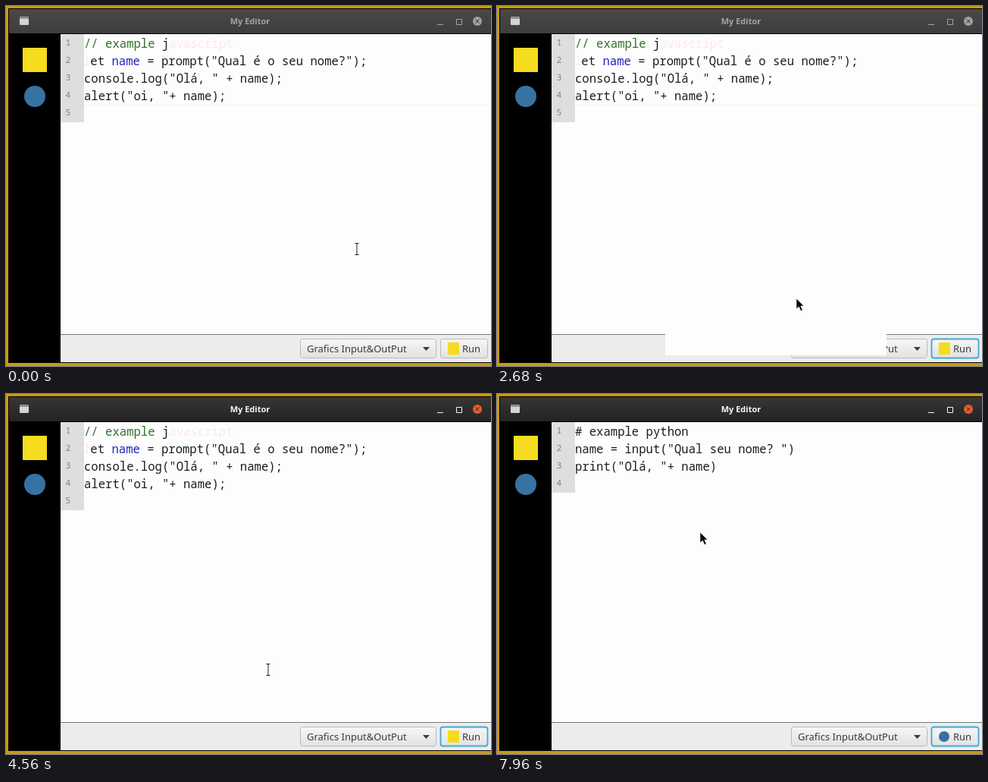
An HTML page that plays this animation: 640x474 px, repeating every 8 s.

```html
<!DOCTYPE html>
<html lang="pt">
<head>
<meta charset="utf-8">
<title>My Editor</title>
<style>
  html, body { margin: 0; width: 100%; height: 100%; overflow: hidden; background: #fdfdfd; }
  svg { display: block; width: 640px; height: 474px; }
  text { white-space: pre; }
  .code { font: 15.6px "Noto Sans Mono", "DejaVu Sans Mono", monospace; fill: #1c1c1c; }
  .num { font: 11.5px "Noto Sans Mono", monospace; fill: #808080; }
  .ui { font: 13px "Noto Sans", "Open Sans", sans-serif; fill: #3a3a3a; }
  .title { font: bold 11px "Noto Sans", "Open Sans", sans-serif; text-anchor: middle; }
  .comment { fill: #32702c; }
  .pale { fill: #ffe9e2; }
  .name { fill: #2420c0; }
</style>
</head>
<body>
<svg viewBox="0 0 640 474">
  <defs>
    <linearGradient id="bar" x2="0" y2="1">
      <stop stop-color="#363636"/><stop offset="1" stop-color="#242424"/>
    </linearGradient>
    <linearGradient id="dimBar" x2="0" y2="1">
      <stop stop-color="#484848"/><stop offset="1" stop-color="#3e3e3e"/>
    </linearGradient>
    <linearGradient id="button" x2="0" y2="1">
      <stop stop-color="#f6f6f6"/><stop offset="1" stop-color="#e2e2e2"/>
    </linearGradient>
  </defs>

  <rect width="640" height="474" fill="#cb9a0e"/>
  <rect x="3" y="3" width="637" height="467"/>
  <rect id="titleBar" x="4" y="4" width="636" height="32"/>
  <rect x="18" y="14" width="12" height="11" rx="1" fill="#d4d4d4"/>
  <path d="M18 15.500H30" stroke="#777" stroke-width="2"/>
  <text id="title" class="title" x="322" y="24">My Editor</text>
  <g id="controls" fill="none">
    <path d="M569 24.500H577M594.500 17.500H601.500V24.500H594.500Z"/>
  </g>
  <circle id="close" cx="622" cy="20" r="6"/>
  <path d="M619.500 17.500L624.500 22.500M624.500 17.500L619.500 22.500" stroke="#402a20"/>

  <rect x="22" y="55" width="32" height="32" fill="#f5dc1f"/>
  <circle cx="38" cy="119" r="14" fill="#3672a2"/>
  <rect x="72" y="37" width="568" height="395" fill="#fdfdfd"/>
  <rect id="caretLine" x="103" y="129" width="537" height="3" fill="#f4fdf0"/>
  <rect id="gutter" x="72" y="37" width="31" fill="#dedede"/>
  <g id="numbers" class="num"></g>

  <g id="js" class="code">
    <text x="103" y="55"><tspan class="comment">// example </tspan>j<tspan class="pale">avascript</tspan></text>
    <text x="102" y="78"><tspan class="pale">l</tspan>et <tspan class="name">name</tspan> = prompt("Qual é o seu nome?");</text>
    <text x="103" y="101">console.log("Olá, " + name);</text>
    <text x="103" y="124">alert("oi, "+ name);</text>
  </g>
  <g id="py" class="code">
    <text x="103" y="55"># example python</text>
    <text x="103" y="78">name = input("Qual seu nome? ")</text>
    <text x="103" y="101">print("Olá, "+ name)</text>
  </g>

  <rect x="72" y="432" width="568" height="37" fill="#ececec"/>
  <path d="M72 432.500H640" stroke="#777"/>
  <rect x="388.500" y="438.500" width="179" height="25" rx="3" fill="url(#button)" stroke="#bababa"/>
  <text class="ui" x="397" y="456">Grafics Input&amp;OutPut</text>
  <path d="M550 449H559L554.500 454Z" fill="#3a3a3a"/>
  <rect id="run" x="573.500" y="438.500" width="62" height="25" rx="3" fill="url(#button)"/>
  <rect id="runJs" x="583" y="443" width="15" height="16" fill="#f5dc1f"/>
  <circle id="runPy" cx="590" cy="451" r="7" fill="#3672a2"/>
  <text class="ui" x="602" y="456">Run</text>
  <rect id="panel" x="222" y="431" width="292" height="29" fill="#fdfdfd"/>

  <g id="cursor">
    <path id="arrow" d="M0 0V14L3.300 11L5.800 16.500L8.300 15.400L5.900 10H10Z" fill="#0a0a0a" stroke="#fff" stroke-width=".6"/>
    <g id="beam" fill="none">
      <path d="M-2.500 -7.500H2.500M0 -7.500V7.500M-2.500 7.500H2.500" stroke="#fff" stroke-width="3"/>
      <path d="M-2.500 -7.500H2.500M0 -7.500V7.500M-2.500 7.500H2.500" stroke="#1c1c1c"/>
    </g>
  </g>
</svg>
<script>
const $ = id => document.getElementById(id);
const set = (id, name, value) => $(id).setAttribute(name, value);
const show = (id, on) => set(id, "visibility", on ? "visible" : "hidden");

const LOOP = 8000;
const CLICK = 1840, PROMPT_OPEN = 2200, PROMPT_CLOSE = 3520;
const ALERT_OPEN = 3880, ALERT_CLOSE = 4440, PYTHON = 5600, RUN_PYTHON = 7240;

// time, x, y of the pointer
const path = [
  [0, 463, 320], [800, 605, 454], [CLICK, 605, 454],
  [2640, 400, 385], [3440, 333, 430], [PROMPT_CLOSE, 333, 430],
  [4320, 350, 396], [4560, 346, 363], [5160, 71, 128], [5400, 32, 122],
  [PYTHON - 40, 32, 122], [5840, 259, 105], [6800, 565, 346],
  [RUN_PYTHON, 608, 455], [7290, 608, 455], [7960, 268, 182], [LOOP, 268, 182]
];

// Speed at a waypoint; zero beside a rest or where the direction turns.
function speed(i, axis) {
  const a = path[i - 1], b = path[i], c = path[i + 1];
  if (!a || !c) return 0;
  const before = (b[axis] - a[axis]) / (b[0] - a[0]);
  const after = (c[axis] - b[axis]) / (c[0] - b[0]);
  return before * after > 0 ? 2 * before * after / (before + after) : 0;
}

function pointer(t, axis) {
  const i = path.findIndex(p => p[0] > t), a = path[i - 1], b = path[i];
  const d = b[0] - a[0], k = (t - a[0]) / d, e = k * k * (3 - 2 * k);
  return a[axis] + (b[axis] - a[axis]) * e
    + d * k * (1 - k) * ((1 - k) * speed(i - 1, axis) - k * speed(i, axis));
}

for (let i = 0; i < 5; i++) {
  $("numbers").insertAdjacentHTML("beforeend",
    `<text x="78.500" y="${52 + 23 * i}">${i + 1}</text>`);
}

function draw(now) {
  const t = now % LOOP;
  const between = (from, to) => t >= from && t < to;
  const python = t >= PYTHON;
  const dim = t < CLICK || between(PROMPT_OPEN, PROMPT_CLOSE) || between(ALERT_OPEN, ALERT_CLOSE);
  const pressed = t > CLICK + 20;

  set("titleBar", "fill", dim ? "url(#dimBar)" : "url(#bar)");
  set("title", "fill", dim ? "#a4a4a4" : "#f6f6f6");
  set("controls", "stroke", dim ? "#a4a4a4" : "#f6f6f6");
  set("close", "fill", dim ? "#a0a0a0" : "#e95a30");
  set("run", "stroke", pressed ? "#3fa9d8" : "#bababa");
  set("run", "stroke-width", pressed ? 1.8 : 1);
  set("gutter", "height", python ? 93 : 116);
  show("caretLine", t < ALERT_CLOSE);
  show("js", !python);
  show("py", python);
  show("runJs", !python);
  show("runPy", python);
  show("panel", between(PROMPT_OPEN, PROMPT_CLOSE + 40));
  $("numbers").lastElementChild.setAttribute("visibility", python ? "hidden" : "visible");

  const x = Math.round(pointer(t, 1)), y = Math.round(pointer(t, 2));
  const beam = x > 72 && y < 432 && !between(CLICK, ALERT_CLOSE) && t < RUN_PYTHON;
  set("cursor", "transform", `translate(${x} ${y})`);
  show("beam", beam);
  show("arrow", !beam);
}

const start = performance.now();
function tick() {
  draw(performance.now() - start);
  requestAnimationFrame(tick);
}
tick();
</script>
</body>
</html>
```
